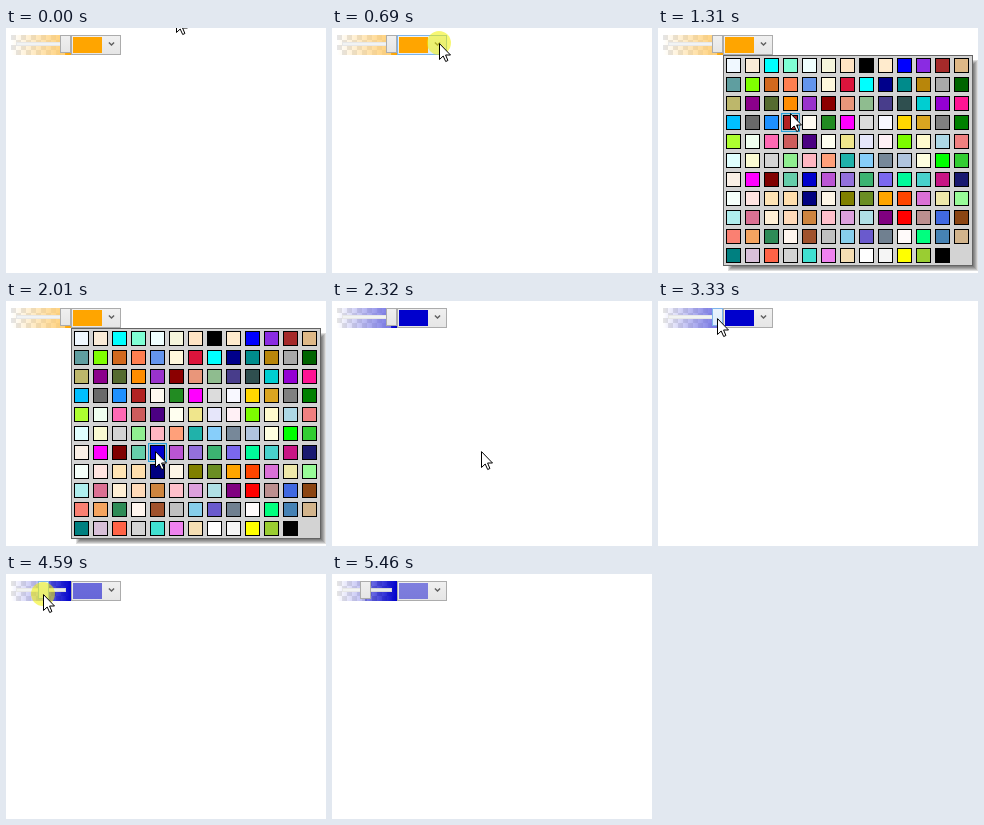
Recreate the animation shown at these times as an HTML page. Size 320x245 px, loop 5.84 s.

```html
<!DOCTYPE html>
<html lang="en">
<head>
<meta charset="utf-8">
<title>Colour picker</title>
<style>
html, body { margin: 0; width: 100%; height: 100%; overflow: hidden; background: #fff; }
svg { display: block; width: 320px; height: 245px; }
.pixel { shape-rendering: crispEdges; }
</style>
</head>
<body>
<svg viewBox="0 0 320 245">
  <defs>
    <pattern id="checker" x="5" y="7" width="10" height="10" patternUnits="userSpaceOnUse">
      <rect width="10" height="10" fill="#fff"/>
      <path d="M0 0h5v5h-5zM5 5h5v5h-5z" fill="#d3d3d3"/>
    </pattern>
    <linearGradient id="ramp">
      <stop class="tint" offset="0" stop-opacity="0"/>
      <stop class="tint" offset="1"/>
    </linearGradient>
    <linearGradient id="plain" x2="0" y2="1">
      <stop offset="0" stop-color="#f0f0f0"/><stop offset="1" stop-color="#e5e5e5"/>
    </linearGradient>
    <linearGradient id="hot" x2="0" y2="1">
      <stop offset="0" stop-color="#ecf4fc"/><stop offset="1" stop-color="#dcecfc"/>
    </linearGradient>
    <clipPath id="below"><rect y="27" width="320" height="218"/></clipPath>
  </defs>

  <g class="pixel">
    <rect x="5" y="7" width="60" height="20" fill="url(#checker)"/>
    <rect x="5" y="7" width="60" height="20" fill="url(#ramp)"/>
    <rect x="10.5" y="14.5" width="49" height="3" fill="#e7eaea" stroke="#d6d6d6"/>
    <rect id="veil" x="5" y="7" height="20" fill="#fff" fill-opacity=".4"/>
    <rect id="thumb" y="7.5" width="10" height="17"/>
    <rect id="combo" x="65.5" y="7.5" width="49" height="19"/>
    <rect id="swatch" x="67" y="9" width="29" height="16"/>
  </g>
  <path d="M102.9 14.5l2.6 2.6 2.6-2.6" fill="none" stroke="#606060" stroke-width="1.4"/>

  <g clip-path="url(#below)">
    <g id="popup" class="pixel">
      <g id="shadow"></g>
      <rect x="65.5" y="27.5" width="249" height="210" fill="#d3d3d3" stroke="#646464"/>
      <rect id="mark" width="18" height="18" fill="#26a0da" fill-opacity=".2" stroke="#26a0da"/>
      <g id="cells" stroke="#000"></g>
    </g>
  </g>

  <circle id="press" r="12" fill="#f0f000" fill-opacity=".55"/>
  <path id="cursor" d="M.5 .6V16.5L4.2 13L6.7 18.5L8.9 17.5L6.6 12H11.5Z" fill="#fff" stroke="#000"/>
</svg>

<script>
const LOOP = 5840, START = 60, STEP = 78.1;
const PITCH = 19, COLS = 13, ROWS = 11, LEFT = 66, TOP = 28;

// Moments of the demo, counted in screen updates
const OPEN = 8, PICK = 27, CLOSE = 29, GRAB = 45, DROP = 64, LEAVE = 66, GONE = 69;

// Where the pointer is at each turn: step, x, y; straight lines between
const path = [[-1, 170, -12], [6, 107, 14], [10, 107, 15], [13, 107, 15], [16, 132, 85],
  [23, 149, 149], [25, 149, 150], [31, 149, 150], [39, 70, 35], [42, 59, 17], [GRAB, 59, 17],
  [52, 49, 18], [58, 37, 20], [DROP, 33, 20], [LEAVE - 1, 33, 20], [GONE, 220, 240]];

const names = `AliceBlue AntiqueWhite Aqua Aquamarine Azure Beige Bisque Black BlanchedAlmond Blue BlueViolet Brown BurlyWood
CadetBlue Chartreuse Chocolate Coral CornflowerBlue Cornsilk Crimson Cyan DarkBlue DarkCyan DarkGoldenrod DarkGray DarkGreen
DarkKhaki DarkMagenta DarkOliveGreen DarkOrange DarkOrchid DarkRed DarkSalmon DarkSeaGreen DarkSlateBlue DarkSlateGray DarkTurquoise DarkViolet DeepPink
DeepSkyBlue DimGray DodgerBlue Firebrick FloralWhite ForestGreen Fuchsia Gainsboro GhostWhite Gold Goldenrod Gray Green
GreenYellow Honeydew HotPink IndianRed Indigo Ivory Khaki Lavender LavenderBlush LawnGreen LemonChiffon LightBlue LightCoral
LightCyan LightGoldenrodYellow LightGray LightGreen LightPink LightSalmon LightSeaGreen LightSkyBlue LightSlateGray LightSteelBlue LightYellow Lime LimeGreen
Linen Magenta Maroon MediumAquamarine MediumBlue MediumOrchid MediumPurple MediumSeaGreen MediumSlateBlue MediumSpringGreen MediumTurquoise MediumVioletRed MidnightBlue
MintCream MistyRose Moccasin NavajoWhite Navy OldLace Olive OliveDrab Orange OrangeRed Orchid PaleGoldenrod PaleGreen
PaleTurquoise PaleVioletRed PapayaWhip PeachPuff Peru Pink Plum PowderBlue Purple Red RosyBrown RoyalBlue SaddleBrown
Salmon SandyBrown SeaGreen SeaShell Sienna Silver SkyBlue SlateBlue SlateGray Snow SpringGreen SteelBlue Tan
Teal Thistle Tomato Transparent Turquoise Violet Wheat White WhiteSmoke Yellow YellowGreen Black`.split(/\s+/);

const $ = id => document.getElementById(id);
const clamp = u => Math.max(0, Math.min(1, u));
const mix = (a, b, u) => a + (b - a) * clamp(u);
const inside = (x, y, l, t, w, h) => x >= l && x < l + w && y >= t && y < t + h;

function set(el, attrs) {
  for (const k in attrs) el.setAttribute(k, attrs[k]);
}

function addRect(parent, x, y, width, height, attrs) {
  const el = document.createElementNS("http://www.w3.org/2000/svg", "rect");
  set(el, { x, y, width, height, ...attrs });
  parent.appendChild(el);
}

names.forEach((fill, i) => addRect($("cells"),
  LEFT + i % COLS * PITCH + 2.5, TOP + Math.floor(i / COLS) * PITCH + 2.5, 14, 14, { fill }));

// Nested layers make the shadow fade outwards
for (let i = 0; i < 5; i++) {
  addRect($("shadow"), 70 + i, 32 + i, 250 - 2 * i, 211 - 2 * i, { "fill-opacity": .13 });
}

function pointerAt(n) {
  const i = path.findIndex(p => p[0] > n);
  if (i < 0) return path[path.length - 1].slice(1);
  const [n0, x0, y0] = path[i - 1], [n1, x1, y1] = path[i];
  const u = (n - n0) / (n1 - n0);
  return [mix(x0, x1, u), mix(y0, y1, u)].map(Math.round);
}

function face(el, lit) {
  set(el, { fill: `url(#${lit ? "hot" : "plain"})`, stroke: lit ? "#7eb4ea" : "#acacac" });
}

function show(el, on) {
  set(el, { visibility: on ? "visible" : "hidden" });
}

function draw(time) {
  const n = Math.floor((time - START) / STEP + .14);
  const [x, y] = pointerAt(n);
  const color = n < CLOSE ? "Orange" : "MediumBlue";
  const drag = n >= GRAB && n < DROP;
  const left = n < GRAB ? 54 : drag ? x - 5 : 28;

  document.querySelectorAll(".tint").forEach(s => set(s, { "stop-color": color }));
  set($("veil"), { width: left });
  set($("thumb"), { x: left + .5 });
  face($("thumb"), drag || inside(x, y, left, 7, 11, 18));
  face($("combo"), inside(x, y, 65, 7, 50, 20));
  set($("swatch"), { fill: color, "fill-opacity": n < LEAVE ? mix(1, .55, (n - GRAB) / 7) : .47 });

  show($("popup"), n > OPEN && n < CLOSE);
  set($("popup"), { transform: `translate(0 ${mix(-135, 0, (n - OPEN - 1) / 3 * 1.93)})` });
  const over = inside(x, y, LEFT, TOP, COLS * PITCH, ROWS * PITCH);
  const cell = names.indexOf("Orange");
  const col = over ? Math.floor((x - LEFT) / PITCH) : cell % COLS;
  const row = over ? Math.floor((y - TOP) / PITCH) : Math.floor(cell / COLS);
  set($("mark"), { x: LEFT + col * PITCH + .5, y: TOP + row * PITCH + .5 });

  show($("press"), n === OPEN || n >= PICK && n < CLOSE || drag);
  set($("press"), { cx: x, cy: y });
  show($("cursor"), n < GONE);
  set($("cursor"), { transform: `translate(${x} ${y})` });
}

function tick() {
  draw(performance.now() % LOOP);
  requestAnimationFrame(tick);
}
tick();
</script>
</body>
</html>
```
